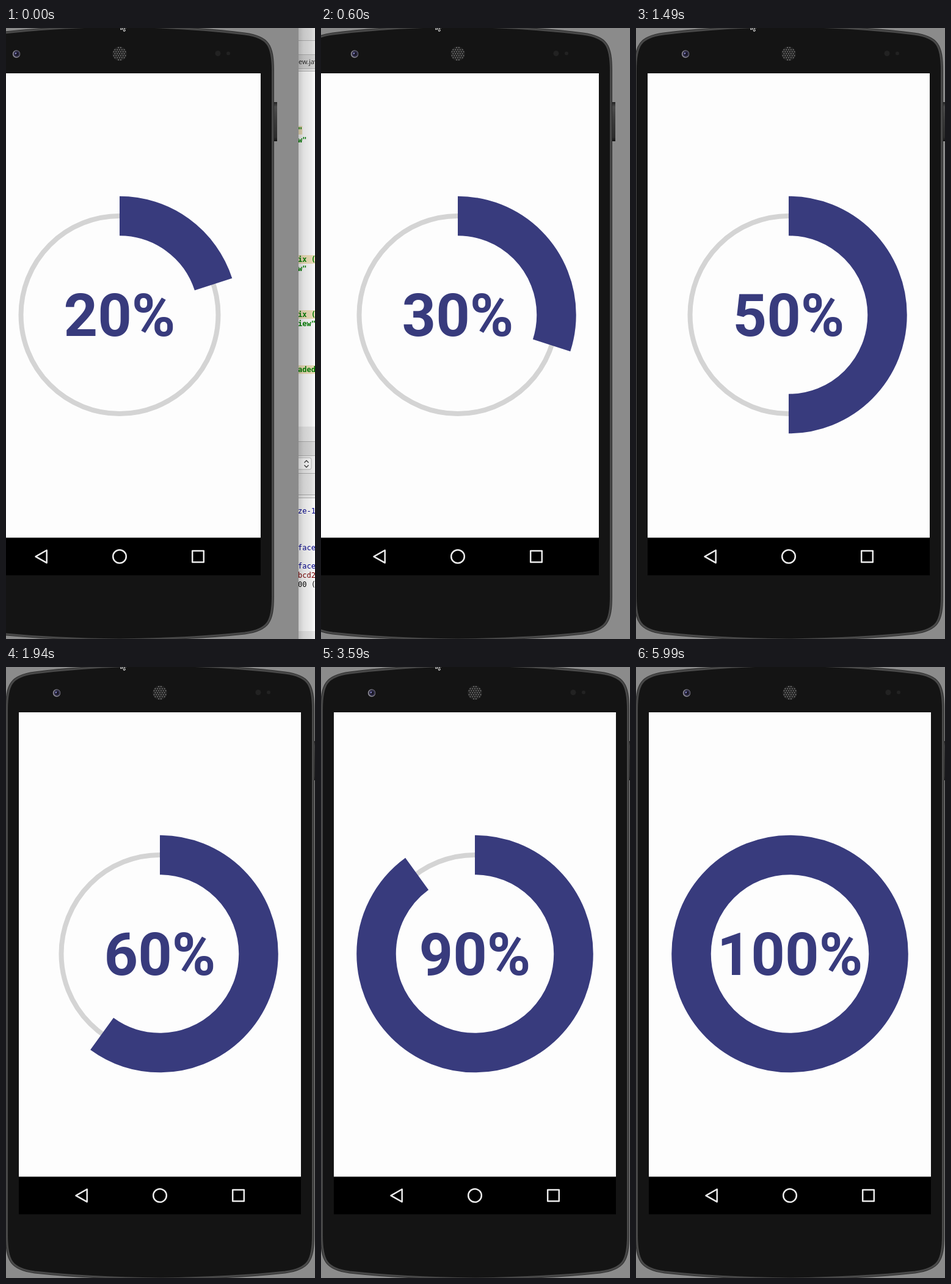
Recreate the animation shown at these times as an HTML page. Size 506 px wide and 998 px high, loop 6240 ms.

```html
<!DOCTYPE html>
<html lang="en">
<head>
<meta charset="utf-8">
<title>Circular progress</title>
<style>
  html, body { margin: 0; width: 100%; height: 100%; overflow: hidden; background: #8b8b8b; }
  svg { display: block; }
  .code { font: 12px "DejaVu Sans Mono", monospace; white-space: pre; }
  .bold { font-weight: bold; }
  .tab { font: 11px "Open Sans", sans-serif; }
  .value { font: bold 97px Roboto, sans-serif; text-anchor: middle; fill: #383b7d; }
  .nav { fill: none; stroke: #ececec; stroke-width: 2.5; stroke-linejoin: round; }
</style>
</head>
<body>
<svg width="506" height="998" viewBox="0 0 506 998">
  <defs>
    <linearGradient id="fade">
      <stop offset="0" stop-opacity=".22"/>
      <stop offset=".3" stop-opacity=".12"/>
      <stop offset=".75" stop-opacity=".07"/>
      <stop offset="1" stop-opacity="0"/>
    </linearGradient>
    <linearGradient id="key" x2="0" y2="1">
      <stop offset="0" stop-color="#222"/>
      <stop offset=".12" stop-color="#4c4c4c"/>
      <stop offset=".5" stop-color="#383838"/>
      <stop offset=".9" stop-color="#2c2c2c"/>
      <stop offset="1" stop-color="#111"/>
    </linearGradient>
    <path id="body" d="M-250.5 70C-250.5 28-243 15-205 10C-140 2-70-2 0-3C70-2 140 2 205 10C243 15 250.5 28 250.5 70
      V928C250.5 970 243 983 205 988C140 995 70 998 0 999C-70 998-140 995-205 988C-243 983-250.5 970-250.5 928Z"/>
  </defs>

  <g id="editor"><rect x="470" width="36" height="998" fill="#fff"/></g>

  <g id="window">
    <rect width="28" height="998" fill="url(#fade)"/>
    <rect x="-700" width="700" height="998" fill="#8b8b8b"/>
  </g>

  <g id="phone">
    <rect x="252" y="121" width="6" height="64" fill="url(#key)"/>
    <use href="#body" stroke="#2f2f2f" stroke-width="5"/>
    <use href="#body" fill="#141414" stroke="#484848" stroke-width="3"/>
    <circle cx="-169" cy="42.5" r="6.2" fill="#8b8992"/>
    <circle cx="-168.5" cy="42.3" r="5" fill="#2b2942"/>
    <circle cx="-168.5" cy="42.3" r="2.4" fill="#14121c"/>
    <circle cx="-170" cy="41.5" r="1.3" fill="#8d8bd0"/>
    <g id="speaker" fill="#777"><circle cy="42" r="11.8" fill="#222"/></g>
    <circle cx="161" cy="41.5" r="4.5" fill="#222"/>
    <circle cx="178" cy="41.5" r="3" fill="#222"/>

    <rect x="-231" y="74" width="462" height="820"/>
    <rect x="-231" y="74" width="462" height="758.5" fill="#fdfdfd"/>
    <g fill="none" transform="translate(0 468.5) rotate(-90)">
      <circle r="161.5" stroke="#d4d4d4" stroke-width="8"/>
      <circle id="arc" r="161.5" stroke="#383b7d" stroke-width="64.5" pathLength="100"/>
    </g>
    <text id="value" class="value" y="503"></text>
    <g class="nav">
      <path d="M-137.5 863.3L-119.3 853V873.6Z"/>
      <circle cy="863.3" r="10.8"/>
      <rect x="119.2" y="854" width="18.6" height="18.6"/>
    </g>
  </g>

  <path id="cursor" d="M0 0V12L3 9.5L5 14.5L7.3 13.5L5.2 8.8H9Z" stroke="#fff"/>
</svg>
<script>
const $ = id => document.getElementById(id);

function add(parent, tag, attrs, text = '') {
  const el = document.createElementNS('http://www.w3.org/2000/svg', tag);
  for (const name in attrs) el.setAttribute(name, attrs[name]);
  el.textContent = text;
  $(parent).append(el);
}

// Editor panes behind the window: top, height, fill
const panes = [
  [0, 20, '#e2e2e2'], [21, 22, '#e6e6e6'], [44, 22, '#d6d6d6'], [67, 3, '#ececec'],
  [651, 24, '#ececec'], [676, 22, '#dedede'], [699, 28, '#f0f0f0'], [728, 34, '#ececec'],
  [763, 4, '#f2f2f2'], [985, 13, '#ececec']
];
for (const [y, height, fill] of panes) {
  add('editor', 'rect', { x: 470, y, width: 36, height, fill });
  add('editor', 'rect', { x: 470, y: y + height, width: 36, height: 1, fill: '#b4b4b4' });
}
add('editor', 'rect', { x: 470, y: 702, width: 30, height: 19, rx: 3, fill: '#fff', stroke: '#bbb' });
add('editor', 'path', { d: 'M488.5 710L492 706.5L495.5 710M488.5 714L492 717.5L495.5 714', fill: 'none', stroke: '#444', 'stroke-width': 1.4 });
add('editor', 'text', { x: 479, y: 59, class: 'tab', fill: '#222' }, 'ew.java');

// Code lines: middle, text, colour, highlighted
const green = '#008000', blue = '#000090';
const lines = [
  [167, '"', green, true], [183, 'w"', green], [378, 'ix (', green, true], [393, 'w"', green],
  [468, 'ix (', green, true], [483, 'iew"', green], [558, 'aded', green, true],
  [789, 'ze-1', blue], [849, 'face', blue], [879, 'face', blue], [894, 'bcd2', '#800000'], [909, '00 (', '#111']
];
for (const [y, text, fill, marked] of lines) {
  if (marked) add('editor', 'rect', { x: 470, y: y - 7, width: 8 + text.length * 7.2, height: 14, fill: '#f3e4bd' });
  add('editor', 'text', { x: 478, y: y + 4, class: fill === green ? 'code bold' : 'code', fill }, text);
}

// Speaker mesh
for (let row = -3; row <= 3; row++) {
  for (let col = -4; col <= 4; col++) {
    const x = col * 3.8 + (row % 2 ? 1.9 : 0), y = row * 3.3;
    if (Math.hypot(x, y) < 11.2) add('speaker', 'circle', { cx: x, cy: 42 + y, r: 1 });
  }
}

// Stepped tracks: [start in ms, ...values]
const LOOP = 6240;
const centre = [[0, 186], [300, 190], [450, 199], [600, 224], [750, 245], [1190, 246], [1340, 248], [1490, 250], [1790, 252]];
const edge = [[0, 479], [150, 483], [300, 487], [450, 505], [600, 555]];
const percent = [[0, 20], [450, 30], [900, 40], [1490, 50], [1940, 60], [2390, 70], [2990, 80], [3590, 90], [4040, 100]];
const pointer = [[0, 188, -9], [4340, 294, -7], [4490, 0, -50], [5690, 440, 996.5], [5840, 451, 996.5], [5990, 0, -50]];
const at = (track, t) => track.findLast(step => step[0] <= t).slice(1);
const move = (id, x, y = 0) => $(id).setAttribute('transform', `translate(${x} ${y})`);

function draw(now) {
  const t = now % LOOP, [p] = at(percent, t);
  move('phone', ...at(centre, t));
  move('window', ...at(edge, t));
  move('cursor', ...at(pointer, t));
  $('arc').setAttribute('stroke-dasharray', `${p} 200`);
  $('value').textContent = p + '%';
}

const start = performance.now();
function frame() {
  draw(performance.now() - start);
  requestAnimationFrame(frame);
}
frame();
</script>
</body>
</html>
```
